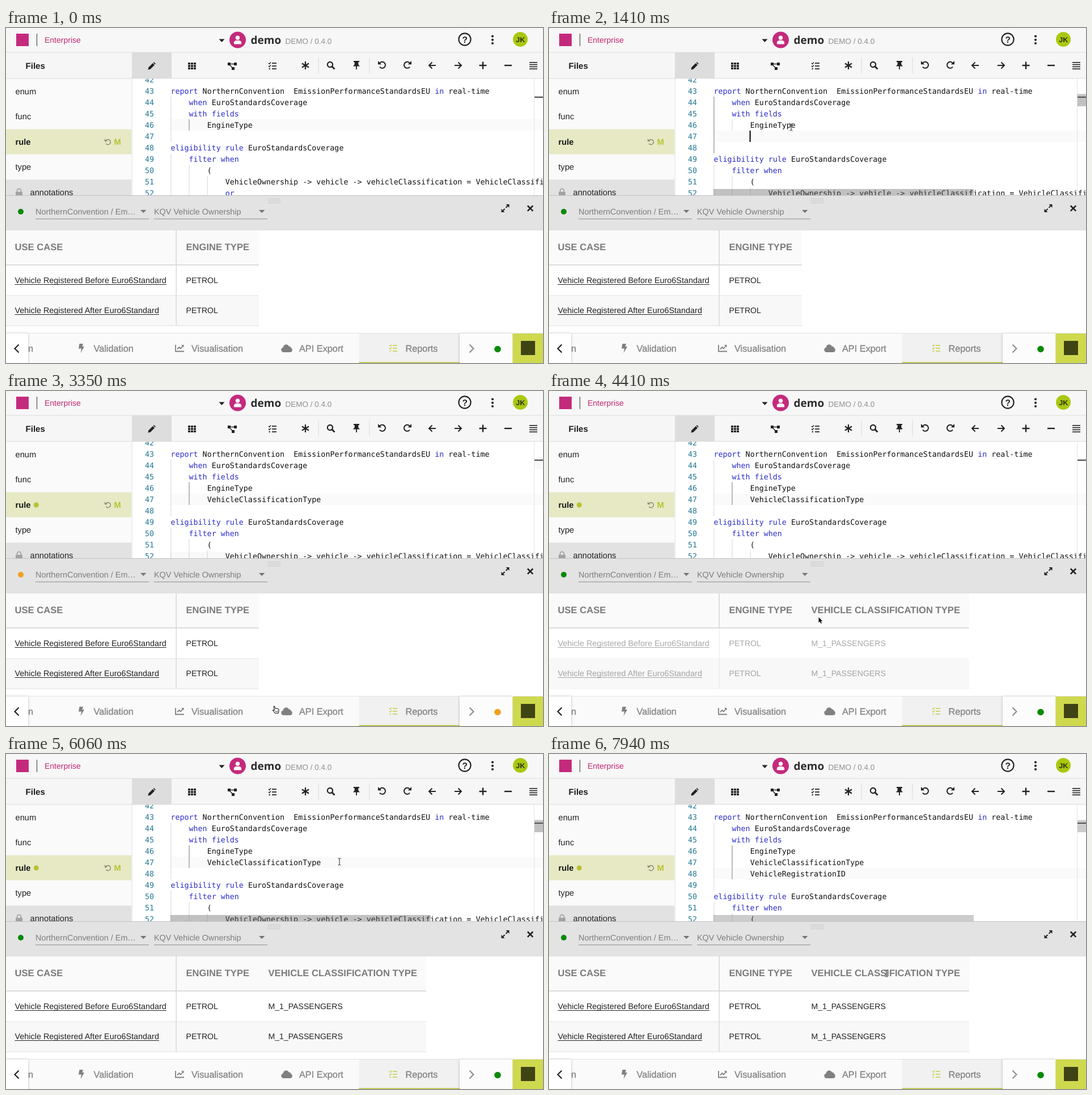
An HTML page with a canvas for the animation above (8000 ms loop, 947 px wide and 591 px high).

```html
<!DOCTYPE html>
<html lang="en">
<head>
<meta charset="utf-8">
<title>Rule editor</title>
<style>
html, body { margin: 0; width: 100%; height: 100%; overflow: hidden; background: #fff; }
canvas { display: block; width: 947px; height: 591px; }
</style>
</head>
<body>
<canvas id="stage"></canvas>
<script>
const W = 947, H = 591, LOOP = 8000;
const canvas = document.getElementById('stage');
const dpr = window.devicePixelRatio || 1;
canvas.width = W * dpr;
canvas.height = H * dpr;
const c = canvas.getContext('2d');

const SANS = '"Liberation Sans", Arial, sans-serif';
const MONO = '13.34px "DejaVu Sans Mono", monospace';
const CHAR = 8.03, CODE_X = 290.4, ROW = 20;
const INK = '#222', PINK = '#c42a7c', LIME = '#b9c233', GREEN = '#078a07', AMBER = '#f0a020';
const KEYWORDS = new Set('report in when with fields eligibility rule filter or'.split(' '));

// Edits and table refreshes
const ENTER_1 = 1410, PASTE_1 = 1710, ENTER_2 = 6350, PASTE_2 = 6650;
const REFRESH = [2410, 4010, 7350], NEW_COLUMN = 4290;

const clamp = v => Math.max(0, Math.min(1, v));
const ramp = (t, a, b) => clamp((t - a) / (b - a));
const within = (t, spans) => spans.some(([a, b]) => t >= a && t < b);

function rect(x, y, w, h, color) {
  c.fillStyle = color;
  c.fillRect(x, y, w, h);
}

function disc(x, y, r, color) {
  c.fillStyle = color;
  c.beginPath();
  c.arc(x, y, r, 0, 7);
  c.fill();
}

function text(s, x, y, size, color, weight = '', family = SANS) {
  c.font = `${weight} ${size}px ${family}`;
  c.fillStyle = color;
  c.fillText(s, x, y);
}

function trace(points) {
  c.beginPath();
  for (let i = 0; i < points.length; i += 2) c.lineTo(points[i], points[i + 1]);
}

function line(points, color, width = 2) {
  trace(points);
  c.strokeStyle = color;
  c.lineWidth = width;
  c.stroke();
}

function shape(points, color) {
  trace(points);
  c.closePath();
  c.fillStyle = color;
  c.fill();
}

function arc(x, y, r, a, b, color, width) {
  c.beginPath();
  c.arc(x, y, r, a, b);
  c.strokeStyle = color;
  c.lineWidth = width;
  c.stroke();
}

function at(x, y, draw, sx = 1, sy = sx) {
  c.save();
  c.translate(x, y);
  c.scale(sx, sy);
  draw();
  c.restore();
}

function clipped(x, y, w, h, draw) {
  c.save();
  c.beginPath();
  c.rect(x, y, w, h);
  c.clip();
  draw();
  c.restore();
}

// Icons, each around its own centre
function undo(color) {
  arc(0.5, 0.3, 5.5, -2.5, 2.5, color, 2);
  shape([-7, -7, -7, -0.8, -0.8, -0.8], color);
}

function arrow() {
  line([-6, 0, 6, 0], INK, 2);
  line([0.5, -5.5, 6, 0, 0.5, 5.5], INK, 2);
}

function checklist(color) {
  for (const y of [-5, 0, 5]) rect(-1, y - 0.8, 8, 1.7, color);
  line([-7, -5, -5.5, -3.5, -3, -6.5], color, 1.4);
  line([-7, 0, -5.5, 1.5, -3, -1.5], color, 1.4);
  disc(-5.3, 5, 1.2, color);
}

function pencil() {
  shape([-6.5, 6.5, -5.7, 2.5, 1.8, -5, 5, -1.8, -2.5, 5.7], INK);
  shape([2.7, -5.8, 4, -7, 6.8, -4, 5.8, -2.7], INK);
}

function grid() {
  for (let i = 0; i < 9; i++) rect(-7 + i % 3 * 5, -6 + Math.floor(i / 3) * 4.3, 4, 3.4, INK);
}

function tree() {
  rect(-8, -6, 5, 5, INK);
  rect(3, -6, 5, 5, INK);
  rect(-1, 2, 5, 5, INK);
  line([-4, -3.5, 4, -3.5], INK, 1.4);
  line([-4.5, -2, 1, 4], INK, 1.4);
}

function asterisk() {
  for (let i = 0; i < 3; i++) {
    const a = Math.PI / 2 + i * Math.PI / 3, x = 7 * Math.cos(a), y = 7 * Math.sin(a);
    line([-x, -y, x, y], INK, 2.2);
  }
}

function search() {
  arc(-1.5, -1.5, 4.6, 0, 7, INK, 2.2);
  line([2, 2, 6.5, 6.5], INK, 2.8);
}

function pin() {
  rect(-5, -7, 10, 2.3, INK);
  shape([-3, -5, 3, -5, 3.5, -0.5, 6, 2.4, -6, 2.4, -3.5, -0.5], INK);
  rect(-0.9, 2, 1.8, 6, INK);
}

function drawHeader() {
  rect(0, 0, W, 43, '#f7f7f7');
  rect(18, 10, 22, 22, PINK);
  rect(54, 10, 1, 22, '#333');
  text('Enterprise', 68, 26, 14, '#c0256f');
  shape([375.5, 19.5, 385.5, 19.5, 380.5, 25], INK);
  disc(408.5, 21, 14.5, PINK);
  disc(408.5, 17.2, 3.7, '#fff');
  c.beginPath();
  c.roundRect(401.8, 22, 13.4, 6.5, [4.5, 4.5, 1.5, 1.5]);
  c.fill();
  text('demo', 431.5, 28, 19, '#2b2b2b', 700, '"Open Sans", sans-serif');
  text('DEMO / 0.4.0', 492.5, 28, 13.5, '#8f8f8f');
  arc(809, 20, 10.6, 0, 7, INK, 2.1);
  text('?', 804.4, 25.5, 15.5, INK, 700);
  for (const y of [14.5, 20.8, 27]) disc(858, y, 2.1, INK);
  disc(907, 20, 13, '#abc810');
  text('JK', 899.2, 24.7, 12.5, '#2b2f10', 700);
}

function drawToolbar() {
  rect(0, 43, W, 46, '#f6f6f6');
  rect(0, 42.5, W, 1, '#dedede');
  rect(222, 43, 70, 46, '#dddddd');
  text('Files', 34.5, 72, 15.1, '#1e1e1e', 700);
  at(257, 67, pencil);
  at(328, 67, grid);
  at(399, 67, tree);
  at(470, 67, () => checklist(INK));
  at(528, 66, asterisk);
  at(573, 66, search);
  at(618, 65, pin);
  at(663, 65, () => undo(INK));
  at(708, 65, () => undo(INK), -1, 1);
  at(752, 66, arrow, -1, 1);
  at(797, 66, arrow);
  rect(834.5, 64.8, 13, 2.4, INK);
  rect(839.8, 59.5, 2.4, 13, INK);
  rect(879, 64.8, 13, 2.4, INK);
  for (let i = 0; i < 4; i++) rect(923, 60 + i * 3.8, 14, 1.6, INK);
  rect(550.5, 52, 1, 28, '#d9d9d9');
  rect(640.5, 52, 1, 28, '#d9d9d9');
  rect(0, 88.5, W, 1, '#dcdcdc');
}

function drawSidebar(t) {
  rect(0, 89, 222, 207, '#fafafa');
  rect(0, 178.6, 221.3, 44.2, '#e6e9c4');
  rect(0, 267.5, 221.3, 28, '#e2e2e2');
  rect(221.7, 89, 1, 207, '#e2e2e2');
  text('enum', 16.5, 117, 14.7, INK);
  text('func', 16.5, 161, 14.7, INK);
  text('rule', 16.5, 206, 14.7, '#151515', 700);
  text('type', 16.5, 250, 14.7, INK);
  text('annotations', 42.5, 295, 14.7, INK);
  if (t >= REFRESH[0]) disc(53.3, 201, 4.5, LIME);
  at(179.5, 201, () => undo('#8b8b7c'), 0.8);
  text('M', 190.5, 206, 14.7, LIME, 700);
  rect(17, 289, 12, 8, '#a3a3a3');
  arc(23, 287, 3.4, Math.PI, 0, '#a3a3a3', 1.8);
  line([19.6, 287, 19.6, 290], '#a3a3a3', 1.8);
  line([26.4, 287, 26.4, 290], '#a3a3a3', 1.8);
}

function codeLines(t) {
  const lines = [
    '',
    'report NorthernConvention  EmissionPerformanceStandardsEU in real-time',
    '    when EuroStandardsCoverage',
    '    with fields',
    '        EngineType'
  ];
  if (t >= ENTER_1) lines.push(t < PASTE_1 ? '' : '        VehicleClassificationType');
  if (t >= ENTER_2) lines.push(t < PASTE_2 ? '' : '        VehicleRegistrationID');
  return lines.concat([
    '',
    'eligibility rule EuroStandardsCoverage',
    '    filter when',
    '        (',
    '            VehicleOwnership -> vehicle -> vehicleClassification = VehicleClassificationEnum',
    '            or'
  ]);
}

function drawCode(s, y) {
  c.font = MONO;
  for (const m of s.matchAll(/\S+/g)) {
    c.fillStyle = KEYWORDS.has(m[0]) ? '#2c2cc9' : '#111';
    c.fillText(m[0], CODE_X + m.index * CHAR, y);
  }
}

const CARET_ON = [[1240, 2180], [2680, 3210], [3710, 4210], [4740, 5240], [6350, 7100], [7540, 7710]];

function drawCaret(t, top, blank) {
  if (!within(t, CARET_ON)) return;
  const col = blank ? 8 : t < ENTER_1 ? 18 : t < ENTER_2 ? 33 : 29;
  rect(CODE_X + col * CHAR - 1, top, 2, ROW, '#000');
}

function drawScrollbars(t) {
  const shown = t < 4000
    ? ramp(t, 640, 780) * (1 - ramp(t, 2820, 3400))
    : ramp(t, 5740, 5880) * (1 - ramp(t, 7800, 8600));
  const grey = `rgba(100,100,100,${0.4 * shown})`;
  rect(290, 284, 459, 11, grey);
  rect(932, 116.5, 15, 21.5, grey);
}

function drawEditor(t) {
  rect(223, 89, W - 223, 207, '#fff');
  const lines = codeLines(t);
  const current = 4 + (t >= ENTER_1) + (t >= ENTER_2);
  const top = i => 81 + i * ROW;
  const blank = lines[current] === '';
  rect(290, top(current), W - 290, ROW, '#fafafa');
  lines.forEach((s, i) => {
    if (top(i) > 296) return;
    const depth = i === 0 ? 0 : s ? s.search(/\S/) / 4 : 1;
    for (let d = 0; d < depth; d++) rect(CODE_X + d * 4 * CHAR, top(i), 1, ROW, '#d6d6d6');
    c.font = MONO;
    c.fillStyle = '#237893';
    c.fillText(String(42 + i), 245, top(i) + 14.6);
    drawCode(s, top(i) + 14.6);
  });
  if (blank) rect(CODE_X, top(2), 1, current * ROW, '#8c8c8c');
  else rect(CODE_X + 4 * CHAR, top(4), 1, (current - 3) * ROW, '#8c8c8c');
  drawCaret(t, top(current), blank);
  rect(931, 89, 1, 207, '#e4e4e4');
  rect(932, 121, 15, 2, '#444');
  drawScrollbars(t);
}

function drawPanelBar(t) {
  rect(0, 295, W, 61.5, '#e3e3e3');
  rect(0, 295, W, 1, '#c2c2c2');
  for (const y of [301, 304.5, 308]) rect(461.5, y, 23, 1, '#c6c6c6');
  const busy = within(t, [[2000, 2410], [3300, 4060], [6940, 7350]]);
  disc(26, 324, 5, busy ? AMBER : GREEN);
  text('NorthernConvention / Em…', 52, 328.5, 14.4, '#7c7c7c');
  text('KQV Vehicle Ownership', 261, 328.5, 14.4, '#7c7c7c');
  for (const x of [52, 261]) {
    rect(x, 336.3, 200, 1, '#8c8c8c');
    shape([x + 185, 321, x + 195.5, 321, x + 190.2, 326.3], '#757575');
  }
  at(880.5, 318, () => {
    line([-4, 4, -1, 1], INK, 2);
    line([1, -1, 4, -4], INK, 2);
    shape([7, -7, 7, -1, 1, -7], INK);
    shape([-7, 7, -7, 1, -1, 7], INK);
  });
  line([919.8, 313.5, 929.2, 322.9], INK, 2.6);
  line([929.2, 313.5, 919.8, 322.9], INK, 2.6);
}

function rowOpacity(t) {
  const start = REFRESH.find(s => t >= s && t < s + 570);
  if (start === undefined) return 1;
  return t < start + 290 ? 1 - ramp(t, start, start + 200) : ramp(t, start + 290, start + 570);
}

function drawTable(t) {
  const wide = t >= NEW_COLUMN;
  const w = wide ? 741 : 446;
  rect(0, 356, W, 183, '#fff');
  rect(0, 356.5, w, 61, '#fafafa');
  rect(0, 356, W, 1, '#dedede');
  rect(0, 417, w, 2, '#dcdcdc');
  rect(299.5, 357, 1.5, 61, '#d4d4d4');
  rect(0, 472.5, w, 53, '#f8f8f8');
  const heads = ['USE CASE', 'ENGINE TYPE', 'VEHICLE CLASSIFICATION TYPE'];
  const cols = [15.5, 317.5, 462.5];
  const count = wide ? 3 : 2;
  for (let i = 0; i < count; i++) text(heads[i], cols[i], 392, 16.6, '#7b7b7b', 700);

  c.globalAlpha = rowOpacity(t);
  rect(299.5, 418, 1.5, 107, '#dadada');
  ['Before', 'After'].forEach((when, i) => {
    const y = 450 + i * 53.3;
    const link = `Vehicle Registered ${when} Euro6Standard`;
    text(link, cols[0], y, 14.4, INK);
    rect(cols[0], Math.round(y + 1.7), c.measureText(link).width, 1, INK);
    text('PETROL', cols[1], y, 14.1, INK);
    if (wide) text('M_1_PASSENGERS', cols[2], y, 14.1, INK);
    rect(0, 471.5 + i * 53.3, w, 1, '#e2e2e2');
  });
  c.globalAlpha = 1;
}

function tabLabel(s, x) {
  const color = '#858585';
  text(s, x, 570.5, 16.3, color);
  c.strokeStyle = color;
  c.lineWidth = 0.35;
  c.strokeText(s, x, 570.5);
}

function drawTabs(t) {
  const grey = '#808080';
  rect(0, 538.5, W, 53, '#fafafa');
  rect(622.5, 539, 177.5, 52, '#f1f1f1');
  rect(622.5, 589.5, 177.5, 1.5, LIME);
  tabLabel('on', 30);
  tabLabel('Validation', 154.5);
  tabLabel('Visualisation', 327);
  tabLabel('API Export', 517);
  tabLabel('Reports', 704.5);
  at(133, 565, () => shape([-3.5, -8, 3, -8, 1.5, -3, 5, -3, -1.5, 8.5, 0, 0.5, -5, 0.5], grey));
  at(306, 565, () => {
    line([-7, -6, -7, 5.5, 8, 5.5], grey, 1.8);
    line([-4, 1.5, -0.5, -2, 2, 0.5, 6.5, -4.5], grey, 1.8);
    shape([3, -6, 7.5, -6, 7.5, -1.5], grey);
  });
  at(495, 565, () => {
    disc(-5.5, 2.8, 4.2, grey);
    disc(-1, -1.5, 5.2, grey);
    disc(4, 0, 3.6, grey);
    disc(5.8, 3, 4, grey);
    rect(-5.5, 1, 11.3, 6, grey);
  });
  at(683, 565, () => checklist('#c9d154'));

  c.save();
  c.shadowColor = 'rgba(0,0,0,.25)';
  c.shadowBlur = 4;
  rect(-6, 539, 45, 60, '#fff');
  rect(800, 539, 93, 60, '#fcfcfc');
  c.restore();
  rect(0, 538, W, 1, '#e2e2e2');
  line([22.5, 558.5, 15.5, 565.5, 22.5, 572.5], INK, 2.2);
  line([817.5, 558.5, 824.5, 565.5, 817.5, 572.5], '#8a8a8a', 2);
  disc(867, 566.5, 5.8, within(t, [[3240, 3820]]) ? AMBER : GREEN);
  rect(893.5, 539, 54, 52, '#cfd94e');
  rect(908, 552, 25, 25, '#3f4415');
}

// Pointer path: time, x, y
const PATH = [
  [60, 318, 461], [410, 399, 186], [600, 399, 186], [1000, 523, 140], [1239, 523, 140],
  [1240, 427, 175], [2380, 427, 175], [2760, 325, 343], [3180, 476, 562], [4010, 476, 562],
  [4410, 475, 399], [4820, 690, 402], [5650, 590, 250], [6060, 588, 190], [6850, 588, 190],
  [7590, 555, 256], [7680, 555, 256], [7940, 595, 387], [LOOP, 595, 387]
];

function ibeam() {
  for (const [color, width] of [['rgba(255,255,255,.4)', 2], [INK, 1]]) {
    line([0, -5, 0, 5], color, width);
    line([-2.6, -6, -1.2, -5.9, 0, -4.8, 1.2, -5.9, 2.6, -6], color, width);
    line([-2.6, 6, -1.2, 5.9, 0, 4.8, 1.2, 5.9, 2.6, 6], color, width);
  }
}

function hand() {
  c.lineJoin = 'round';
  const outline = [-4, -5.5, -2.5, -6, -1, -1.8, 1, -2, 3, -1.5, 5, -0.5, 5, 3, 4, 6.5, -1.5, 6.5, -5.5, 1.5, -4.5, 0.5, -2.6, 1.5];
  shape(outline, '#fff');
  line(outline.concat(outline.slice(0, 2)), INK, 1.1);
  for (const x of [-0.5, 1.2, 2.9]) line([x, 2, x, 4.8], INK, 0.7);
}

function arrowPointer() {
  c.lineJoin = 'round';
  const outline = [0, 0, 0, 9.8, 2.2, 7.8, 3.8, 11.3, 5.4, 10.6, 3.9, 7.2, 6.8, 7];
  line(outline.concat(0, 0), '#fff', 2);
  shape(outline, '#111');
}

function drawPointer(t) {
  if (t < PATH[0][0]) return;
  const i = PATH.findIndex(p => p[0] > t);
  const [a, b] = [PATH[i - 1], PATH[i]];
  const k = ramp(t, a[0], b[0]);
  const x = a[1] + (b[1] - a[1]) * k, y = a[2] + (b[2] - a[2]) * k;
  const overText = y < 296 || t < 500 || t > 7000;
  at(x, y, overText ? ibeam : t < 4010 ? hand : arrowPointer);
}

function frame(now) {
  const t = now % LOOP;
  c.setTransform(dpr, 0, 0, dpr, 0, 0);
  c.textRendering = 'geometricPrecision';
  rect(0, 0, W, H, '#fff');
  clipped(0, 89, W, 207, () => {
    drawEditor(t);
    drawSidebar(t);
  });
  drawHeader();
  drawToolbar();
  drawPanelBar(t);
  drawTable(t);
  drawTabs(t);
  drawPointer(t);
}

const began = performance.now();
function tick() {
  frame(performance.now() - began);
  requestAnimationFrame(tick);
}
tick();
</script>
</body>
</html>
```
